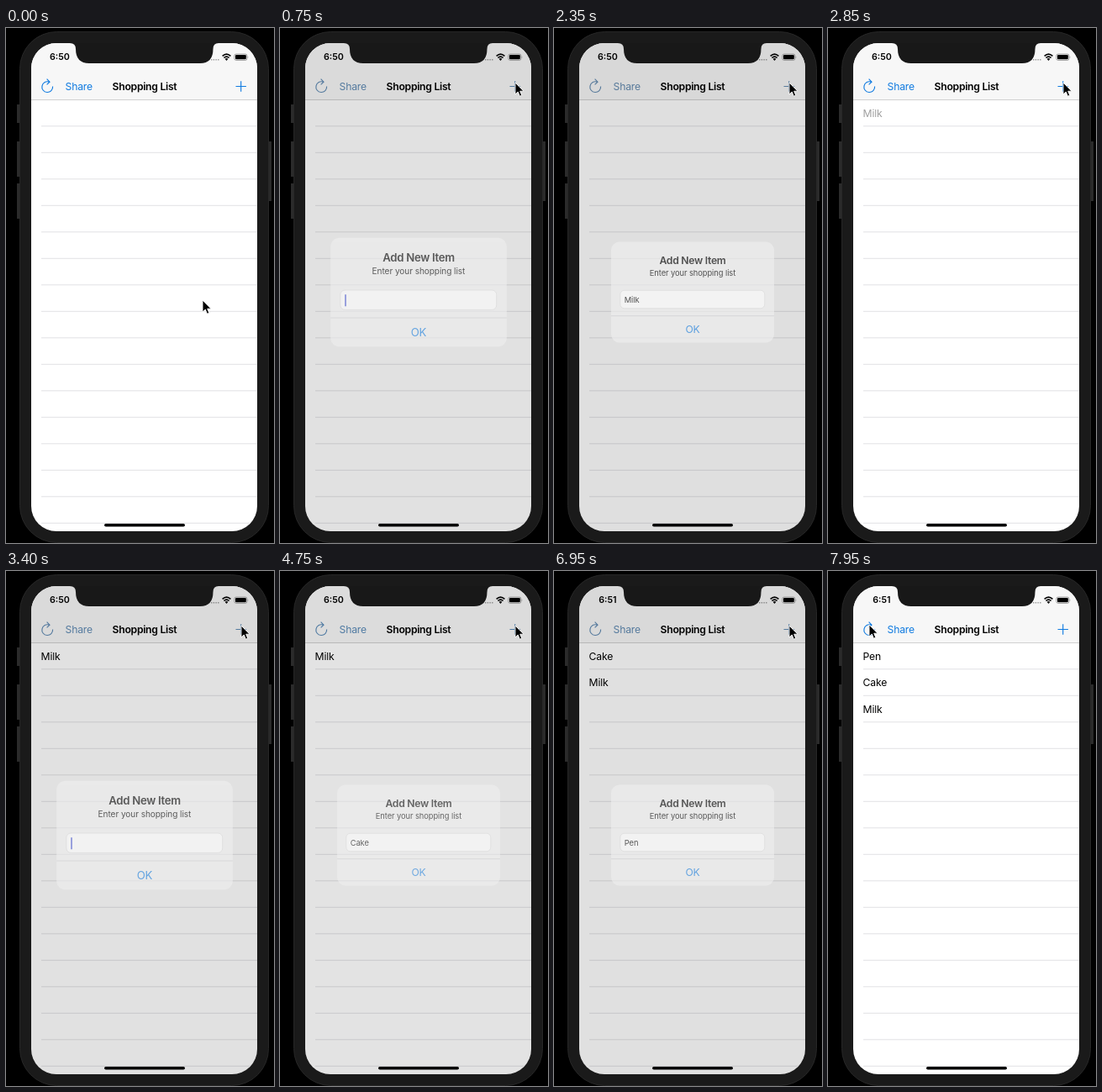
An HTML page that plays this animation: 319 by 613 pixels, repeating every 8 s.

```html
<!DOCTYPE html>
<html lang="en">
<head>
<meta charset="utf-8">
<title>Shopping List</title>
<style>
  html, body { margin: 0; width: 100%; height: 100%; overflow: hidden; background: #000; }
  svg { display: block; width: 100%; height: 100%; font: 12.2px Inter, Roboto, sans-serif; letter-spacing: -.2px; }
  .bold { font-weight: 600; letter-spacing: -.28px; }
  .mid { text-anchor: middle; }
  .small { font-size: 9.3px; letter-spacing: -.05px; }
  .line { fill: none; stroke: currentColor; stroke-width: 1.15; }
  #bar { color: #117be0; }
</style>
</head>
<body>
<svg viewBox="0 0 319 613">
  <defs>
    <clipPath id="screen"><rect x="30" y="18" width="269" height="581" rx="30"/></clipPath>
  </defs>

  <rect width="319" height="613"/>
  <path fill="#2b2b2b" d="M13 91h4v22h-4zM13 135h4v42h-4zM13 185h4v42h-4zM312 135h4v71h-4z"/>
  <rect x="16.5" y="4.5" width="296" height="608" rx="44" fill="#1a1a1a" stroke="#272727"/>

  <g clip-path="url(#screen)">
    <rect x="30" y="18" width="269" height="581" fill="#fff"/>
    <g id="separators" stroke="#e2e2e4"></g>
    <g id="rows"></g>
    <rect x="30" y="18" width="269" height="67" fill="#f7f7f7"/>
    <path stroke="#d0d0d0" d="M30 85.5H299"/>
    <g id="bar">
      <path class="line" d="M55.6 69.5A6.4 6.4 0 1 1 51.6 64.2M48.6 60.7L52 64.2L48.6 67.4"/>
      <text x="70.6" y="74" fill="currentColor">Share</text>
      <path class="line" d="M273.5 69.5h12.4M279.7 63.3v12.4"/>
    </g>
    <text class="bold mid" x="165" y="74">Shopping List</text>
    <path fill="#999" d="M244 37h1.4v1.4h-1.4zM246.7 37h1.4v1.4h-1.4zM249.4 37h1.4v1.4h-1.4zM252.1 37h1.4v1.4h-1.4z"/>
    <rect id="dim" x="30" y="18" width="269" height="581"/>

    <text id="clock" class="bold mid" x="63.9" y="38.2" style="font-size:10.7px;letter-spacing:0">6:50</text>
    <path fill="none" stroke="#000" stroke-width="1.6" d="M257.6 33.4Q262.5 28.8 267.4 33.4M259.4 35.5Q262.5 32.7 265.6 35.5"/>
    <path d="M260.6 36.8Q262.5 35.4 264.4 36.8L262.5 38.9Z"/>
    <rect x="271.9" y="31" width="15" height="7.4" rx="2" fill="none" stroke="#777" stroke-width=".7"/>
    <rect x="273" y="32.1" width="12.8" height="5.2" rx="1.1"/>
    <path fill="#777" d="M287.7 33.4q1.4 1.3 0 2.6z"/>
    <rect x="117" y="590" width="96" height="3.6" rx="1.8"/>
    <path fill="#181818" d="M76 17V18Q83 18 83 25Q83 42 99 42H231Q246.500 42 246.500 25Q246.500 18 253 18V17Z"/>

    <g id="alert">
      <rect x="68" y="254.500" width="194" height="120" rx="10" fill="#f0f0f0"/>
      <text class="bold mid" x="165" y="280.500">Add New Item</text>
      <text class="small mid" x="165" y="295">Enter your shopping list</text>
      <rect x="78.800" y="312.200" width="172" height="21.600" rx="5" fill="#fff" stroke="#dadada" stroke-width=".8"/>
      <text id="field" class="small" x="83.700" y="326.700"></text>
      <rect id="caret" y="317" width="1.400" height="13" fill="#3a4bd0"/>
      <path stroke="#d2d2d4" d="M68 342.700H262"/>
      <text class="mid" x="165" y="363" fill="#117be0">OK</text>
    </g>
  </g>

  <path id="cursor" d="M0 0V14L3.300 11L5.400 16.200L7.800 15.200L5.700 10.200H10Z" stroke="#fff" stroke-width=".9"/>
</svg>

<script>
const LOOP = 8000, TICK = 50, ROW = 31.5, TOP = 85.3;
const $ = id => document.getElementById(id);
const clamp = v => Math.max(0, Math.min(1, v));
const smooth = v => { v = clamp(v); return v * v * (3 - 2 * v); };
const mix = (a, b, k) => a + (b - a) * k;

// Critically damped spring, settled after about 330 ms.
function spring(ms) {
  const x = Math.max(0, ms) * 0.0228;
  const v = 1 - (1 + x) * Math.exp(-x);
  return v > 0.99 ? 1 : v;
}

const items = [
  { text: 'Milk', open: 662, close: 2294, insert: 2725, keys: [1400, 1650, 1800, 2000] },
  { text: 'Cake', open: 3312, close: 4683, insert: 5125, keys: [4050, 4200, 4350, 4450] },
  { text: 'Pen', open: 5476, close: 6890, insert: 7275, keys: [6250, 6400, 6600] }
];

function add(parent, tag, attrs) {
  const el = document.createElementNS('http://www.w3.org/2000/svg', tag);
  for (const name in attrs) el.setAttribute(name, attrs[name]);
  return parent.appendChild(el);
}

for (let i = 1; i <= 16; i++) add($('separators'), 'path', { d: `M42 ${TOP + i * ROW}H299` });
for (const item of items) {
  item.row = add($('rows'), 'text', { x: 41.6 });
  item.row.textContent = item.text;
}

function drawRows(t) {
  let shift = 0;
  for (const item of [...items].reverse()) {
    const shown = smooth((t - item.insert) / 300);
    item.row.setAttribute('y', TOP + 20.2 + shift * ROW);
    item.row.setAttribute('opacity', shown);
    shift += shown;
  }
}

function drawAlert(t) {
  const item = items.filter(i => t >= i.open).pop();
  const opened = item ? spring(t - item.open) : 0;
  const level = item ? opened * (1 - spring(t - item.close)) : 0;

  $('dim').setAttribute('opacity', 0.2 * level);
  const tint = [17, 123, 224].map(c => Math.round(mix(c, 148, level)));
  $('bar').style.color = `rgb(${tint})`;
  $('alert').setAttribute('opacity', level);
  if (!item) return;

  const scale = 1.2 - 0.2 * opened;
  $('alert').setAttribute('transform', `translate(165 314.5) scale(${scale}) translate(-165 -314.5)`);

  const count = item.keys.filter(k => t >= k).length;
  const field = $('field'), caret = $('caret');
  field.textContent = item.text.slice(0, count);
  caret.setAttribute('x', 83.8 + (count ? field.getComputedTextLength() : 0));
  const blink = count ? 1 : 1 - clamp((t - item.open - 560) / 130);
  caret.setAttribute('opacity', t < item.close ? blink : 0);
}

function cursorAt(t) {
  if (t < 7300) {
    const u = smooth((t - 40) / 410), v = 1 - u;
    return [v * v * 234 + 2 * u * v * 320 + u * u * 280, v * v * 324 + 2 * u * v * 100 + u * u * 65];
  }
  if (t < 7750) return [mix(280, 99, smooth((t - 7300) / 300)), mix(65, 67, smooth((t - 7300) / 300))];
  const k = clamp((t - 7890) / 60);
  return [mix(89, 49, k), mix(67, 64, k)];
}

const start = performance.now();
function draw() {
  const now = Math.max(0, performance.now() - start) % LOOP;
  const t = Math.floor(now / TICK) * TICK;
  drawRows(t);
  drawAlert(t);
  $('clock').textContent = t < 6950 ? '6:50' : '6:51';
  $('cursor').setAttribute('transform', `translate(${cursorAt(now)})`);
  requestAnimationFrame(draw);
}
draw();
</script>
</body>
</html>
```
